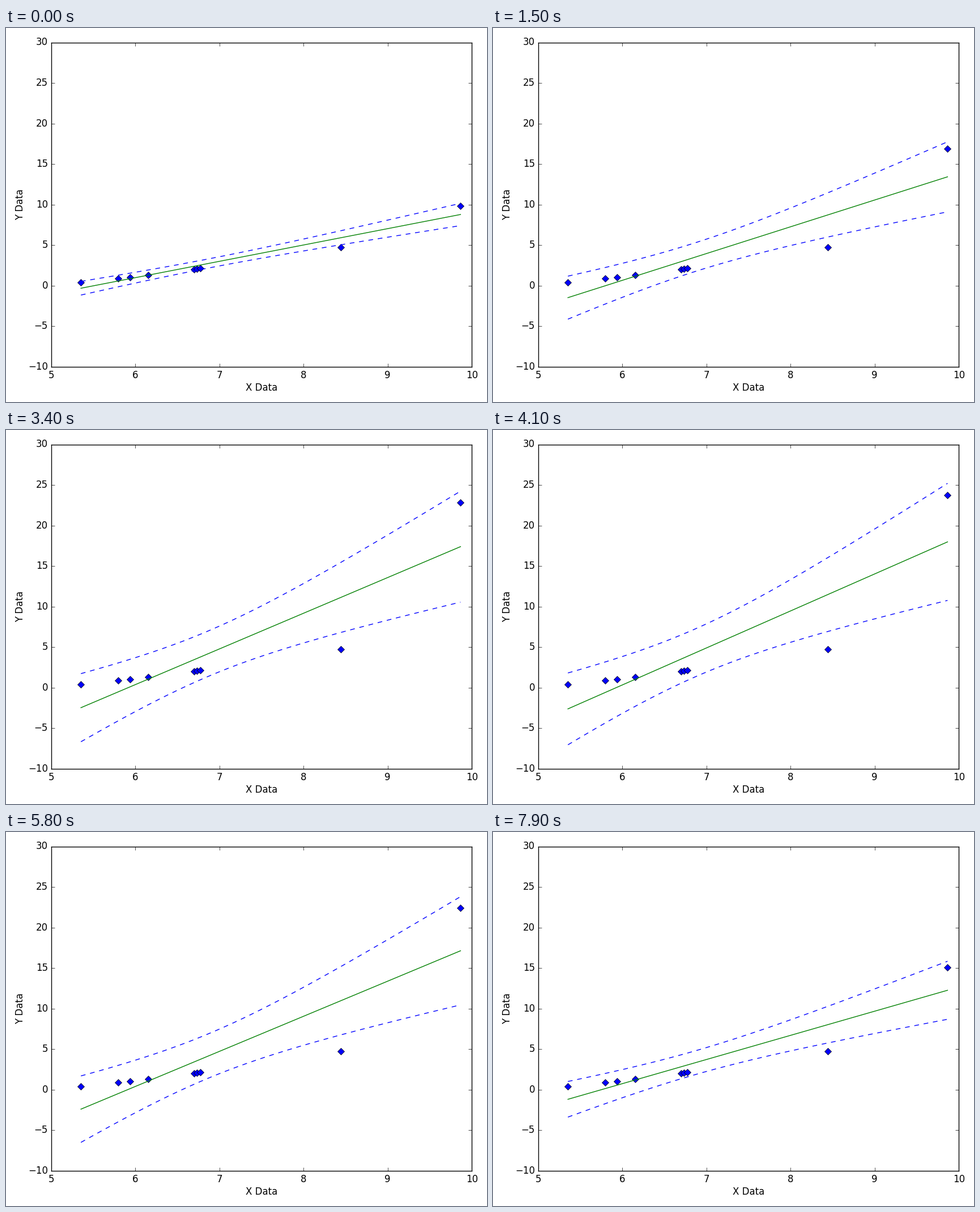
These frames come from a looping animation (849 px wide and 660 px high, 8000 ms). A matplotlib script:

```python
import numpy as np
import matplotlib.pyplot as plt
from matplotlib.animation import FuncAnimation

plt.style.use("classic")
plt.rcParams.update({
    "font.family": "DejaVu Sans",
    "figure.facecolor": "white",
    "savefig.facecolor": "white",
    "savefig.dpi": 100,
})

W, H, DPI = 849, 660, 100
LEFT, RIGHT, TOP, BOTTOM = 79.5, 822.2, 25.5, 598
FRAMES, INTERVAL = 80, 100

X = np.array([5.355, 5.796, 5.936, 6.156, 6.698, 6.731, 6.773, 8.443, 9.866])
Y = np.array([0.4, 0.87, 1.05, 1.32, 2.05, 2.1, 2.18, 4.75, 9.87])
T95 = 2.3646  # two-sided 95 % Student t, 7 degrees of freedom
LIFT = 14     # how far the last point rises
HALF_WAVE = 90

grid = np.linspace(X[0], X[-1], 200)
dx = X - X.mean()
sxx = np.sum(dx ** 2)
leverage = np.sqrt(1 / len(X) + (grid - X.mean()) ** 2 / sxx)


def fit(y):
    """Least-squares line on the grid and half-width of its confidence band."""
    slope = np.sum(dx * y) / sxx
    resid = y - y.mean() - slope * dx
    s = np.sqrt(np.sum(resid ** 2) / (len(X) - 2))
    return y.mean() + slope * (grid - X.mean()), T95 * s * leverage


fig = plt.figure(figsize=(W / DPI, H / DPI), dpi=DPI)
ax = fig.add_axes([LEFT / W, 1 - BOTTOM / H,
                   (RIGHT - LEFT) / W, (BOTTOM - TOP) / H])
ax.set(xlim=(5, 10), ylim=(-10, 30),
       xticks=range(5, 11), yticks=range(-10, 31, 5))

fig.text((LEFT + RIGHT) / 2 / W, 1 - 640 / H, "X Data",
         ha="center", va="baseline")
fig.text(30 / W, 1 - (TOP + BOTTOM) / 2 / H, "Y Data", rotation=90,
         rotation_mode="anchor", ha="center", va="baseline")

points, = ax.plot([], [], "bD")
line, = ax.plot([], [], "g-")
upper, = ax.plot([], [], "b--")
lower, = ax.plot([], [], "b--")


def update(i):
    y = Y.copy()
    y[-1] += LIFT * np.sin(np.pi * i / HALF_WAVE)
    mid, half = fit(y)
    points.set_data(X, y)
    line.set_data(grid, mid)
    upper.set_data(grid, mid + half)
    lower.set_data(grid, mid - half)
    return points, line, upper, lower


anim = FuncAnimation(fig, update, frames=FRAMES, interval=INTERVAL,
                     repeat=True, repeat_delay=0)
plt.show()
```
